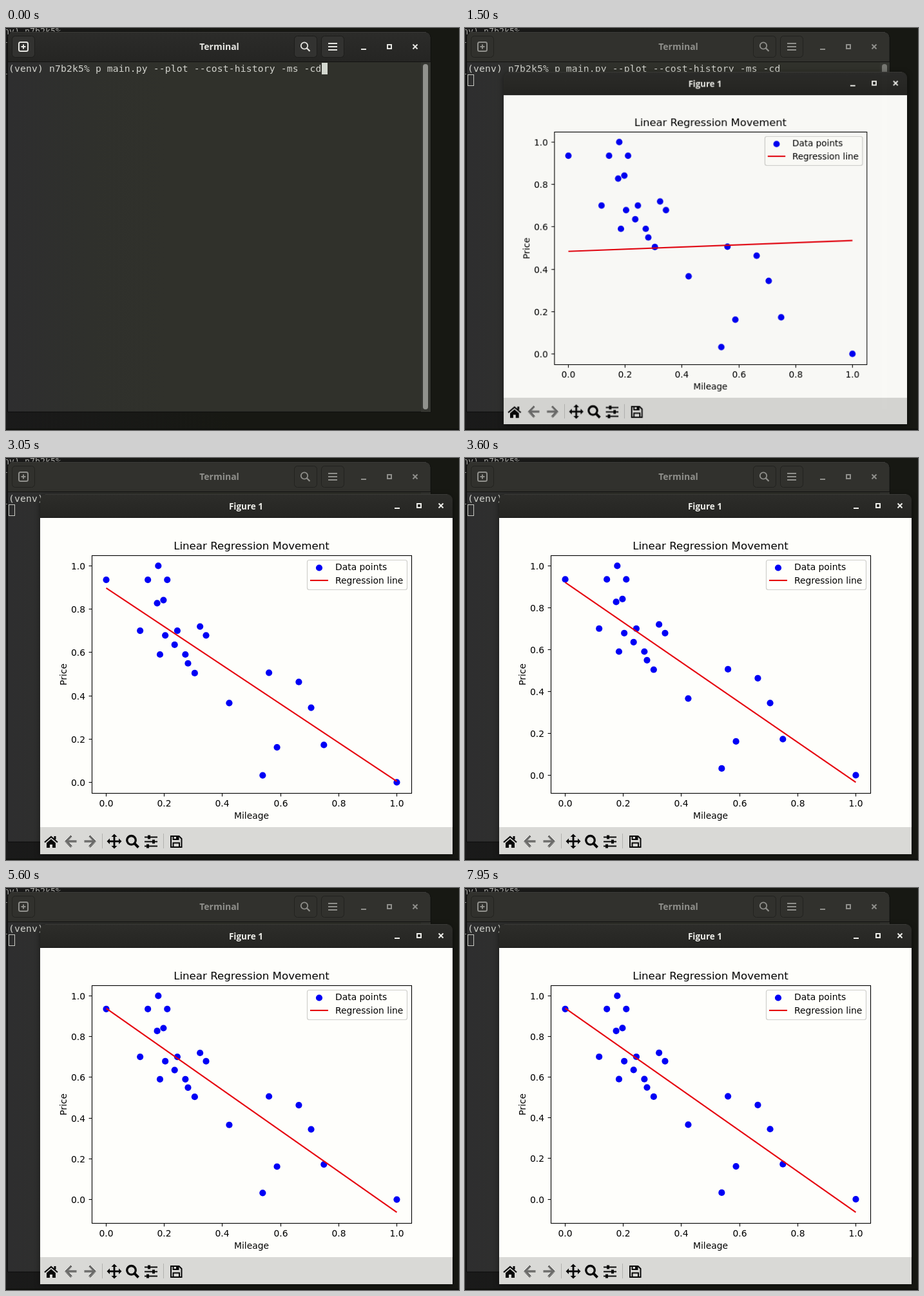
Recreate the animation shown at these times as an HTML page with a canvas. Size 703x624 px, loop 8000 ms.

```html
<!DOCTYPE html>
<html lang="en">
<head>
<meta charset="utf-8">
<title>Linear regression</title>
<style>
html, body { margin: 0; width: 100%; height: 100%; overflow: hidden; background: #181916; }
canvas { display: block; }
</style>
</head>
<body>
<canvas id="stage" width="703" height="624"></canvas>
<script>
const LOOP = 8000, STEP = 50;
const BLINK = 450, KEY = 950, RUN = 1000, BLUR = 1400, OPEN = 1418, FIT = 1430;
const SANS = '"DejaVu Sans", sans-serif', MONO = '"DejaVu Sans Mono", monospace', UI = '"Open Sans", sans-serif';
const PROMPT = '(venv) n7b2k5% ';
const WIN = { x: 53, y: 56, w: 640, h: 559 };
const AX = { l: 133, r: 629, t: 150.6, b: 520.2 };

// mileage, price
const cars = [
  [240000, 3650], [139800, 3800], [150500, 4400], [185530, 4450], [176000, 5250], [114800, 5350],
  [166800, 5800], [89000, 5990], [144500, 5999], [84000, 6200], [82029, 6390], [63060, 6390],
  [74000, 6600], [97500, 6800], [67000, 6800], [76025, 6900], [48235, 6900], [93000, 6990],
  [60949, 7490], [65674, 7555], [54000, 7990], [68500, 7990], [22899, 7990], [61789, 8290]
];
const points = cars.map(([km, price]) => [(km - 22899) / 217101, (price - 3650) / 4640]);

const stage = document.getElementById('stage').getContext('2d');
const figure = document.createElement('canvas');
figure.width = WIN.w;
figure.height = WIN.h;
const fig = figure.getContext('2d');
fig.translate(-WIN.x, -WIN.y);

// checkerboard for the disabled arrows
const tile = document.createElement('canvas');
tile.width = tile.height = 2;
const tileCtx = tile.getContext('2d');
tileCtx.fillRect(0, 0, 1, 1);
tileCtx.fillRect(1, 1, 1, 1);
const stipple = fig.createPattern(tile, 'repeat');

function rect(c, x, y, w, h, color) {
  c.fillStyle = color;
  c.fillRect(x, y, w, h);
}

function round(c, x, y, w, h, r, fill, stroke, width = 1) {
  c.beginPath();
  c.roundRect(x, y, w, h, r);
  if (fill) { c.fillStyle = fill; c.fill(); }
  if (stroke) { c.strokeStyle = stroke; c.lineWidth = width; c.stroke(); }
}

function path(c, pts) {
  c.beginPath();
  for (let i = 0; i < pts.length; i += 2) c.lineTo(pts[i], pts[i + 1]);
}

function line(c, color, width, ...pts) {
  path(c, pts);
  c.strokeStyle = color;
  c.lineWidth = width;
  c.stroke();
}

function poly(c, color, ...pts) {
  path(c, pts);
  c.fillStyle = color;
  c.fill();
}

function disc(c, x, y, r, color) {
  c.beginPath();
  c.arc(x, y, r, 0, 7);
  c.fillStyle = color;
  c.fill();
}

function ring(c, x, y, r, color, width) {
  c.beginPath();
  c.arc(x, y, r, 0, 7);
  c.strokeStyle = color;
  c.lineWidth = width;
  c.stroke();
}

function text(c, str, x, y, font, color, align = 'left', spacing = 0) {
  c.font = font;
  c.fillStyle = color;
  c.textAlign = align;
  c.letterSpacing = spacing + 'px';
  c.fillText(str, x, y);
  c.letterSpacing = '0px';
}

function fade(c, x0, y0, x1, y1, ...colors) {
  const g = c.createLinearGradient(x0, y0, x1, y1);
  colors.forEach((color, i) => g.addColorStop(i / (colors.length - 1), color));
  return g;
}

function controls(c, x, y, gap, color) {
  rect(c, x - 4, y + 3, 8, 2, color);
  c.strokeStyle = color;
  c.lineWidth = 2;
  c.strokeRect(x + gap - 3, y - 3, 6, 6);
  const k = x + 2 * gap;
  line(c, color, 2, k - 3.5, y - 3.5, k + 3.5, y + 3.5);
  line(c, color, 2, k + 3.5, y - 3.5, k - 3.5, y + 3.5);
}

function drawTerminal(t) {
  const c = stage, active = t < BLUR;
  const ink = active ? '#e6e6e2' : '#8f8f8b';
  rect(c, 0, 0, 703, 624, fade(c, 0, 0, 703, 0, '#1a1a1a', '#171813', '#171813'));
  rect(c, 0, 622, 703, 2, '#0e0f0c');
  text(c, PROMPT, -27, 10, '13.3px ' + MONO, '#a8a8a4');
  for (const y of [22, 71]) rect(c, 0, y, 2, 1, '#8a8a86');

  round(c, 2.5, 6, 656.5, 590, [9, 9, 0, 0], fade(c, 3, 0, 250, 0, '#2e2e2f', '#2f302c', '#30312b'), '#0b0b0a');
  round(c, 3, 6.5, 655.5, 46, [8, 8, 0, 0], active ? fade(c, 0, 6, 0, 52, '#2c2c2a', '#252523') : '#31312d');
  rect(c, 9, 6, 643, 1, '#3a3a37');
  rect(c, 3, 52, 656, 1, '#121211');

  for (const x of [10, 448, 490])
    round(c, x - .5, 12.5, 35, 33, 5, active ? '#323230' : '#31312d', active ? '#1d1d1b' : '#22221f');
  round(c, 20, 22, 14, 14, 2.5, null, ink, 2);
  line(c, ink, 2, 23.5, 29, 30.5, 29);
  line(c, ink, 2, 27, 25.5, 27, 32.5);
  ring(c, 463, 27.5, 5.2, ink, 1.8);
  line(c, ink, 2.2, 466.8, 31.3, 471.5, 36);
  for (const y of [23, 28, 33]) rect(c, 500, y, 14, 2, ink);
  text(c, 'Terminal', 331, 34, 'bold 14px ' + UI, ink, 'center');
  controls(c, 555, 29, 40, ink);

  rect(c, 644, 53, 15, 543, '#353631');
  round(c, 647, 56, 8, 536, 4, active ? '#91928d' : '#767772');

  const font = '14.67px ' + MONO, spacing = 9 - 14.67 * .602;
  text(c, PROMPT + 'p main.py --plot --cost-history -ms -cd', 4, 68, font, '#d2d3cd', 'left', spacing);
  if (!active) {
    c.strokeStyle = '#c8c9c3';
    c.lineWidth = 1;
    c.strokeRect(4.5, 72.5, 9, 17);
  } else if (t >= RUN) rect(c, 4, 72, 9, 18, '#d3d7cf');
  else if (t < BLINK || t >= KEY) rect(c, 490, 54, 9, 18, '#d3d7cf');
}

// gradient descent from zero: a fast and a slow mode decay towards the best fit
function fit(t) {
  const s = Math.max(0, t - FIT) / 1000;
  const slow = 1.1888 * Math.exp(-1.467 * s), fast = -.4885 * Math.exp(-33 * s);
  return { b: .9393 - .379 * slow + fast, m: -1.0036 + slow + .379 * fast };
}

function drawPlot(t) {
  const c = fig, ink = '#000', blue = '#0000f5', red = '#e6000c', small = '13.89px ' + SANS;
  const { b, m } = fit(t);
  const low = Math.min(0, b + m);
  const unitX = (AX.r - AX.l) / 1.1, unitY = (AX.b - AX.t) / 1.1 / (1 - low);
  const px = x => AX.l + unitX * (.05 + x);
  const py = y => AX.t + (AX.b - AX.t) / 22 + unitY * (1 - y);

  rect(c, 53, 93, 640, 480, '#fefefb');
  for (const [x, y] of points) disc(c, px(x), py(y), 5.1, blue);
  line(c, red, 2.08, px(0), py(b), px(1), py(b + m));

  c.strokeStyle = ink;
  c.lineWidth = 1.1;
  c.strokeRect(133.5, 151.5, 496, 369);
  for (let i = 0; i <= 5; i++) {
    const label = (i / 5).toFixed(1);
    const x = Math.floor(px(i / 5)) + .5, y = Math.floor(py(i / 5)) + .5;
    line(c, ink, 1.1, x, 520.5, x, 525.4);
    line(c, ink, 1.1, 128.6, y, 133.5, y);
    text(c, label, x, 541, small, ink, 'center');
    text(c, label, 123, y + 5, small, ink, 'right');
  }
  text(c, 'Linear Regression Movement', 381, 142, '16.67px ' + SANS, ink, 'center');
  text(c, 'Mileage', 381, 560, small, ink, 'center');
  c.save();
  c.translate(93.5, 336);
  c.rotate(-Math.PI / 2);
  text(c, 'Price', 0, 0, small, ink, 'center');
  c.restore();

  round(c, 467.5, 158.5, 155, 46, 3, 'rgba(255,255,252,.8)', '#cfcfcc', 1.2);
  disc(c, 486, 170.5, 5.1, blue);
  line(c, red, 2.08, 472, 190, 500, 190);
  text(c, 'Data points', 511, 174, small, ink);
  text(c, 'Regression line', 511, 195, small, ink);
}

function drawToolbar() {
  const c = fig, ink = '#080808';
  rect(c, 53, 573, 640, 42, '#d9d9d6');
  // home
  line(c, ink, 2.2, 60, 596.5, 70, 588, 80, 596.5);
  rect(c, 74.5, 587, 3, 5, ink);
  poly(c, ink, 63, 597.5, 70, 591.5, 77, 597.5, 77, 605, 72, 605, 72, 600, 68, 600, 68, 605, 63, 605);
  // back, forward
  for (const [x, d] of [[92.5, 1], [138.5, -1]]) {
    line(c, stipple, 3.4, x + 1 * d, 595, x + 17 * d, 595);
    line(c, stipple, 3.4, x + 9 * d, 586.5, x + d, 595, x + 9 * d, 603.5);
  }
  rect(c, 149, 583, 1, 23, '#b2b2af');
  rect(c, 244, 583, 1, 23, '#b2b2af');
  // pan
  c.save();
  c.translate(168, 595);
  for (let i = 0; i < 4; i++) {
    line(c, ink, 2.8, 0, 0, 8, 0);
    poly(c, ink, 11.5, 0, 7, -4.5, 7, 4.5);
    c.rotate(Math.PI / 2);
  }
  c.restore();
  // zoom
  ring(c, 194.5, 593.3, 6.8, ink, 3.3);
  line(c, ink, 4, 199.3, 598.2, 205.5, 604.5);
  // sliders
  for (const [x, y] of [[222, 588.5], [229, 595.5], [220, 602.5]]) {
    line(c, ink, 2, 215, y, 235, y);
    rect(c, x - 2, y - 3, 4, 6, ink);
  }
  // save
  line(c, ink, 2, 256, 587, 268.5, 587, 272.5, 591, 272.5, 604, 256, 604, 256, 586);
  c.strokeStyle = ink;
  c.strokeRect(259.5, 587, 8, 5);
  c.strokeRect(259.5, 597.5, 9.5, 6.5);
  rect(c, 264, 588, 3, 4, ink);
}

function drawFigure(t) {
  const c = fig;
  c.clearRect(WIN.x, WIN.y, WIN.w, WIN.h);
  round(c, 53, 56, 640, 40, [9, 9, 0, 0], fade(c, 0, 56, 0, 93, '#2d2d2a', '#252522'));
  rect(c, 61, 56, 624, 1, '#3a3a37');
  rect(c, 53, 92, 640, 1, '#141413');
  text(c, 'Figure 1', 372.5, 80, 'bold 13.5px ' + UI, '#eeeeea', 'center');
  controls(c, 607, 74, 34, '#eeeeea');
  drawPlot(t);
  drawToolbar();

  const ease = t < OPEN + 150 ? 1 - 2 ** (-(t - OPEN) / 15) : 1;
  const sx = .01 + .99 * ease, sy = .05 + .95 * ease;
  const w = WIN.w * sx, h = WIN.h * sy;
  stage.save();
  stage.globalAlpha = ease;
  stage.shadowColor = 'rgba(0,0,0,.5)';
  stage.shadowBlur = 8;
  stage.shadowOffsetY = 2;
  stage.drawImage(figure, WIN.x + (WIN.w - w) / 2, WIN.y + WIN.h - h, w, h);
  stage.restore();
}

function frame(now) {
  const t = Math.floor(now % LOOP / STEP) * STEP;
  drawTerminal(t);
  if (t >= OPEN) drawFigure(t);
  requestAnimationFrame(frame);
}
requestAnimationFrame(frame);
</script>
</body>
</html>
```
